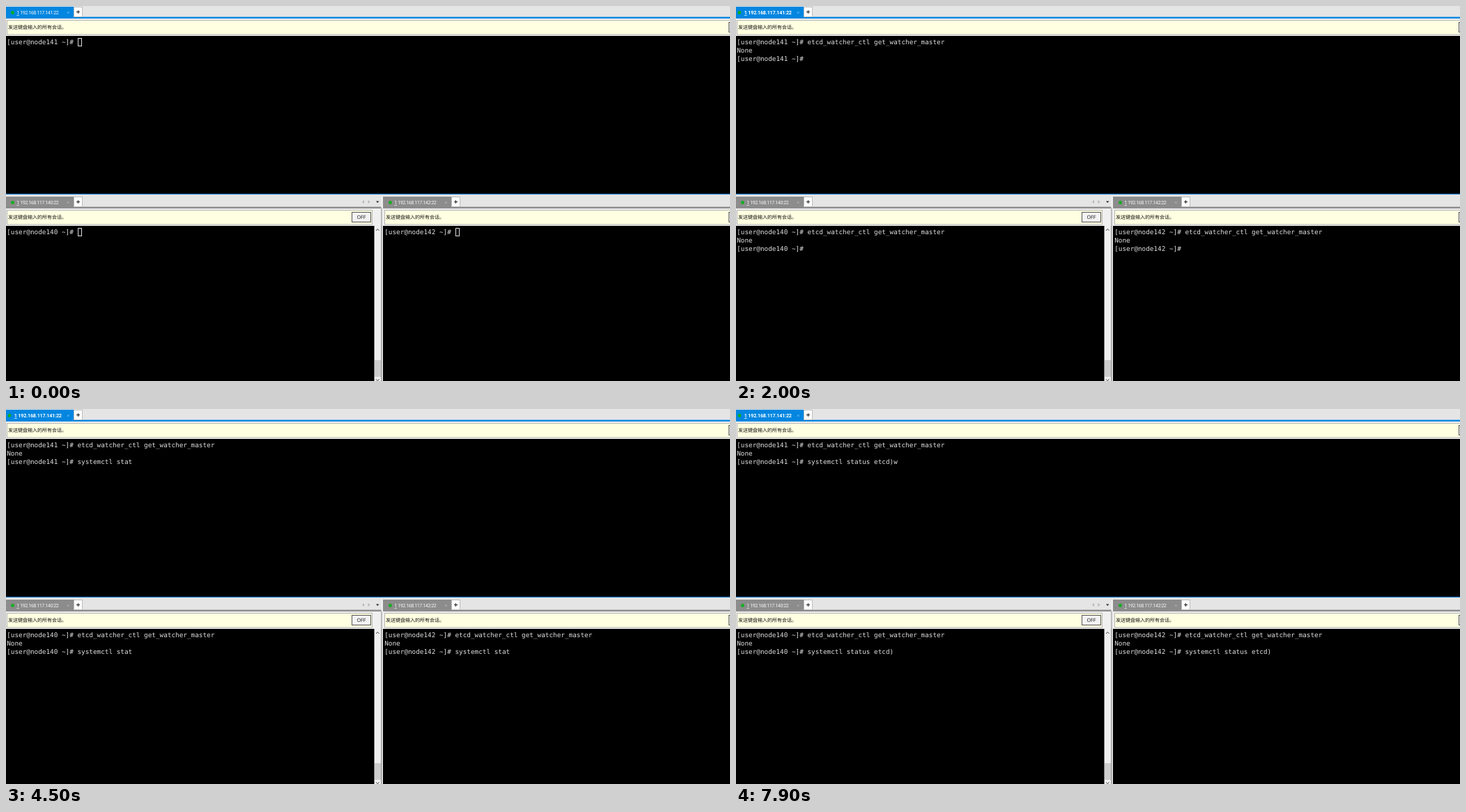
These frames come from a looping animation (1039x539 px, 8 s). An HTML page:

```html
<!DOCTYPE html>
<html lang="zh">
<head>
<meta charset="utf-8">
<title>Terminals</title>
<style>
html, body { margin: 0; width: 100%; height: 100%; overflow: hidden; background: #000; }
svg { display: block; width: 1039px; height: 539px; }
text { white-space: pre; text-rendering: geometricPrecision; }
.term { font: 9.36px "DejaVu Sans Mono", monospace; fill: #dedede; }
.tab { font: 7.2px Roboto, sans-serif; letter-spacing: -.49px; fill: #f4f4f4; }
.tab.on { font-weight: 700; letter-spacing: -.2px; fill: #fff; }
.note { font: 7px "Noto Sans CJK SC", "Noto Sans CJK", sans-serif; fill: #111; }
.btn { font: 7.2px "Open Sans", sans-serif; fill: #111; text-anchor: middle; }
</style>
</head>
<body>
<svg id="stage" viewBox="0 0 1039 539"></svg>
<script>
const LOOP = 8000;
const NS = "http://www.w3.org/2000/svg";
const stage = document.getElementById("stage");
const QUERY = "etcd_watcher_ctl get_watcher_master";
const STATUS = "systemctl status etcd)w";

// [time, typed characters]
const KEYS = [
  [3000, 1], [3200, 3], [3400, 4], [3500, 5], [3600, 6], [3800, 7], [4000, 9],
  [4200, 11], [4300, 12], [4400, 13], [4500, 14], [4900, 15], [5100, 16],
  [5900, 18], [6200, 19], [6500, 20], [6700, 21], [7300, 22], [7500, 23]
];

function add(parent, name, attrs, content) {
  const el = document.createElementNS(NS, name);
  for (const key in attrs) el.setAttribute(key, attrs[key]);
  if (content) el.textContent = content;
  parent.appendChild(el);
  return el;
}

function rect(parent, x, y, width, height, fill, stroke) {
  const attrs = { x, y, width, height, fill };
  if (stroke) attrs.stroke = stroke;
  return add(parent, "rect", attrs);
}

function path(parent, d, stroke, fill = "none") {
  return add(parent, "path", { d, stroke, fill });
}

function button(parent, x, y) {
  rect(parent, x + .5, y + .5, 27, 14, "#f3f3f3", "#555");
  add(parent, "text", { x: x + 14, y: y + 10.2, class: "btn" }, "OFF");
}

function makePane({ x, y, width, barEnd, buttonX, host, ip, active }) {
  const g = add(stage, "g", { transform: `translate(${x} ${y})` });
  const accent = active ? "#0286e0" : "#8c8c8c";

  rect(g, -1, 0, width + 1, 43, "#e5e5e5");
  rect(g, -1, 18, width + 1, 25, "#f0f0f0");
  rect(g, -1, 1, 98, 15, accent);
  rect(g, -1, 15.6, width + 1, 2.4, accent);
  rect(g, 97.5, 1.5, 12, 14, "#fff", "#bdbdbd");
  path(g, "M101 8.5h5M103.5 6v5", "#222");
  const dot = add(g, "circle", { cx: 9.5, cy: 9.5, r: 2.4, fill: "#0fae1c" });
  const label = add(g, "text", { x: 15.3, y: 12.2, class: "tab" });
  add(label, "tspan", { "text-decoration": "underline" }, "1");
  add(label, "tspan", {}, ` ${ip}:22`);
  path(g, "M87.8 8l3 3m0-3l-3 3", active ? "#8cc6f0" : "#bcbcbc").setAttribute("stroke-width", .7);

  rect(g, 1.5, 20.5, barEnd - 2, 20.5, "#ffffe1", "#b4b4b4");
  add(g, "text", { x: 3, y: 33.3, class: "note" }, "发送键盘输入的所有会话。");
  button(g, buttonX, 23);

  rect(g, -1, 43, width + 1, active ? 227 : 223, "#000");
  const lines = [55, 67, 79].map(ly => add(g, "text", { x: 1.2, y: ly, class: "term" }));
  const cursor = rect(g, 103.5, 46.5, 5, 11, "none", "#dedede");
  return { prompt: `[user@${host} ~]# `, active, dot, label, lines, cursor };
}

rect(stage, 0, 0, 1039, 539, "#f0f0f0");
const panes = [
  makePane({ x: 0, y: 0, width: 1039, barEnd: 1045, buttonX: 1037,
    host: "node141", ip: "192.168.117.141", active: true }),
  makePane({ x: 0, y: 273, width: 538.5, barEnd: 526, buttonX: 496,
    host: "node140", ip: "192.168.117.140" }),
  makePane({ x: 542, y: 273, width: 497, barEnd: 510, buttonX: 495,
    host: "node142", ip: "192.168.117.142" })
];

// Splitter between the upper and lower panes
rect(stage, 0, 271, 1039, 2.5, "#e5e5e5");
rect(stage, 0, 269.8, 1039, 1.2, "#2389d8");

// Tab scroll arrows and scrollbar of the lower left pane
path(stage, "M514 279v5l-3-2.5z", "none", "#b5b5b5");
path(stage, "M519.5 279v5l3-2.5z", "none", "#b5b5b5");
path(stage, "M531 280.5h4.4l-2.2 2.4z", "none", "#222");
rect(stage, 528.5, 316, 10, 223, "#f0f0f0");
rect(stage, 529, 509, 9, 24, "#cdcdcd");
path(stage, "M531 323l2.3-2.5 2.3 2.5M531 536.3l2.3 2.5 2.3-2.5", "#444");
rect(stage, 538.5, 291, 1, 248, "#777");
rect(stage, 539.5, 291, 1.5, 248, "#e5e5e5");

function setText(el, value) {
  if (el.textContent !== value) el.textContent = value;
}

function draw(t) {
  const typed = KEYS.reduce((n, [at, count]) => t >= at ? count : n, 0);
  for (const p of panes) {
    if (p.active) {
      const bold = t >= 300;
      p.dot.setAttribute("cx", bold ? 5 : 9.5);
      p.label.setAttribute("x", bold ? 11.8 : 15.3);
      p.label.setAttribute("class", bold ? "tab on" : "tab");
    }
    const count = !p.active && t >= 7900 ? 22 : typed;
    setText(p.lines[0], p.prompt + (t >= 800 ? QUERY : ""));
    setText(p.lines[1], t >= 2000 ? "None" : "");
    setText(p.lines[2], t >= 2000 ? p.prompt + STATUS.slice(0, count) : "");
    p.cursor.setAttribute("visibility", t < 800 ? "visible" : "hidden");
  }
}

const start = performance.now();
function tick() {
  draw((performance.now() - start) % LOOP);
  requestAnimationFrame(tick);
}
tick();
</script>
</body>
</html>
```
